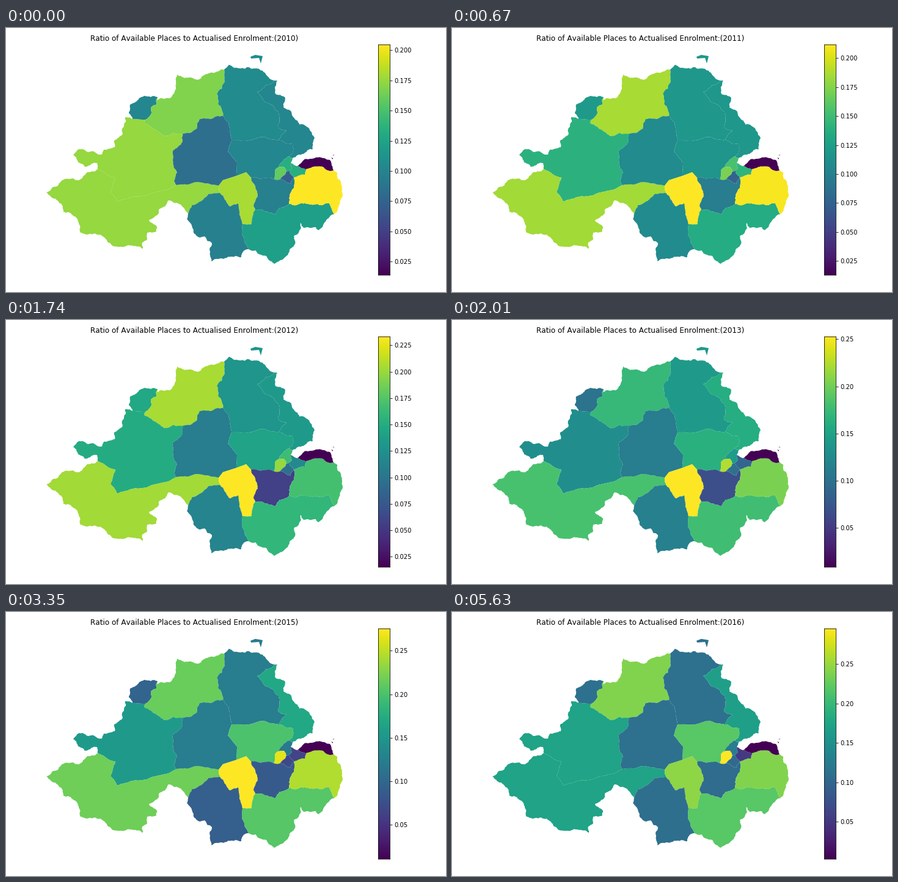
These frames come from a looping animation (720 px wide and 432 px high, 6.7 s). A matplotlib script:

```python
import numpy as np
import matplotlib.pyplot as plt
from matplotlib.animation import FuncAnimation
from matplotlib.patches import Polygon

W, H, DPI = 720, 432, 72
plt.rcParams.update({"font.family": "DejaVu Sans", "text.kerning_factor": 6})
rng = np.random.default_rng(7)
viridis = plt.get_cmap("viridis")

fig = plt.figure(figsize=(W / DPI, H / DPI), dpi=DPI, facecolor="white")
ax = fig.add_axes([0, 0, 1, 1], xlim=(0, W), ylim=(H, 0))
ax.axis("off")


def crinkle(p, q, bend):
    """Fractal line from p up to q: bend the middle, then each half."""
    d = q - p
    length = np.hypot(*d)
    if length < 3:
        return [p]
    middle = (p + q) / 2 + np.array([-d[1], d[0]]) * rng.uniform(-bend, bend)
    return crinkle(p, middle, bend) + crinkle(middle, q, bend)


def line(*points, bend=0.12):
    pts = np.array(points, float)
    path = [v for p, q in zip(pts, pts[1:]) for v in crinkle(p, q, bend)]
    return np.array(path + [pts[-1]])


def coast(*points):
    return line(*points, bend=0.16)


def ring(first, *arcs):
    """Join arcs end to end, reversing those that run the other way."""
    if any(np.array_equal(first[0], arcs[0][k]) for k in (0, -1)):
        first = first[::-1]
    path = list(first)
    for arc in arcs:
        path.extend(arc[1:] if np.array_equal(arc[0], path[-1]) else arc[-2::-1])
    return path


# Junctions: on the coast clockwise, then inland
derry_e, north_e, causeway_e, glens_s = (248, 113), (357, 68), (444, 86), (469, 213)
harbour, bay_w, bay_e, ards_s = (466, 221), (476, 226), (536, 233), (537, 305)
down_w, armagh_w, lakes_n, derry_w = (397, 362), (298, 304), (150, 231), (207, 149)
derry_s, mid_nw, mid_ne, antrim_nw = (228, 150), (289, 173), (355, 144), (369, 184)
antrim_ne, antrim_e, mid_sw, mid_se = (447, 184), (463, 210), (279, 257), (377, 242)
craig_w, craig_sw, craig_s = (348, 258), (350, 270), (387, 321)
craig_e, lisburn_nw, lisburn_se = (408, 297), (401, 245), (463, 288)
lisburn_ne, cwest_s, cwest_n = (471, 245), (439, 248), (446, 228)
cwest_e, csouth_w, csouth_n, ceast_e = (459, 235), (449, 247), (464, 233), (491, 231)

# Coastline and outer border
derry_coast = coast(derry_w, (201, 138), (203, 125), (214, 120), (226, 111), derry_e)
north_coast = coast(derry_e, (247, 118), (268, 115), (278, 97), (280, 76), (292, 82),
                    (318, 83), (330, 75), north_e)
causeway_coast = coast(north_e, (365, 60), (383, 66), (395, 64), (420, 70), (426, 77),
                       causeway_e)
glens_coast = coast(causeway_e, (441, 108), (456, 113), (454, 130), (465, 135),
                    (480, 158), (497, 167), (505, 180), (502, 198), (487, 206), glens_s)
harbour_north = line(glens_s, harbour)
harbour_east = line(harbour, bay_w)
bay_coast = coast(bay_w, (485, 218), (500, 214), (521, 213), (530, 216), bay_e)
ards_coast = coast(bay_e, (542, 237), (542, 245), (550, 264), (546, 288), ards_s)
down_coast = coast(ards_s, (511, 331), (507, 326), (487, 327), (482, 319), (480, 332),
                   (471, 341), (472, 355), (458, 374), (439, 386), (417, 371), down_w)
armagh_coast = coast(down_w, (388, 366), (385, 375), (352, 377), (336, 382),
                     (333, 362), (337, 352), (325, 341), (313, 341), (296, 313), armagh_w)
lakes_coast = coast(armagh_w, (286, 289), (266, 282), (250, 297), (250, 303), (234, 314),
                    (247, 325), (246, 333), (231, 335), (231, 346), (223, 351),
                    (224, 361), (198, 356), (182, 358), (155, 338), (121, 334),
                    (119, 318), (94, 301), (80, 279), (66, 269), (85, 258), (96, 247),
                    (120, 249), (133, 236), lakes_n)
west_coast = coast(lakes_n, (149, 221), (140, 222), (129, 227), (110, 208), (125, 198),
                   (135, 203), (157, 207), (160, 199), (178, 195), (177, 184),
                   (190, 175), (195, 146), derry_w)

# Borders between districts
derry_north = line(derry_e, (246, 125), (237, 130), (238, 139), derry_s)
derry_west = line(derry_w, derry_s, bend=0.05)
north_west = line(derry_s, (226, 155), (238, 162), (259, 177), mid_nw)
north_mid = line(mid_nw, (312, 165), (317, 149), (334, 149), mid_ne)
north_causeway = line(north_e, (358, 87), (345, 108), (347, 124), mid_ne)
causeway_glens = line(causeway_e, (425, 93), (411, 105), (424, 121), (446, 137),
                      (445, 163), (459, 168), antrim_ne)
causeway_mid = line(mid_ne, (364, 155), antrim_nw, bend=0.05)
causeway_antrim = line(antrim_nw, (398, 184), (422, 178), antrim_ne, bend=0.06)
glens_antrim = line(antrim_ne, (470, 190), (469, 205), antrim_e)
glens_city = line(antrim_e, glens_s)
mid_west = line(mid_nw, (289, 186), (273, 201), (275, 229), (280, 236), (275, 250), mid_sw)
mid_antrim = line(antrim_nw, (363, 202), (378, 220), mid_se, bend=0.03)
mid_lakes = line(craig_w, (313, 252), mid_sw, bend=0.06)
west_lakes = line(mid_sw, (262, 265), (230, 274), (182, 284), (171, 268), (179, 245),
                  lakes_n, bend=0.06)
mid_craig = line(mid_se, (355, 249), craig_w, bend=0)
antrim_craig = line(mid_se, (393, 236), lisburn_nw, bend=0)
craig_lakes = line(craig_w, craig_sw)
craig_armagh = line(craig_sw, (367, 292), (380, 287), craig_s)
armagh_lakes = line(armagh_w, (304, 290), (320, 283), (331, 272), craig_sw)
armagh_down = line(down_w, (386, 337), craig_s, bend=0.08)
craig_down = line(craig_s, (402, 321), craig_e)
craig_lisburn = line(lisburn_nw, (412, 276), (405, 290), craig_e)
lisburn_down = line(craig_e, (440, 305), (448, 294), lisburn_se)
ards_down = line(ards_s, (529, 287), (516, 290), (490, 287), lisburn_se)
ards_lisburn = line(lisburn_se, (464, 276), (471, 262), lisburn_ne)
bay_ards = line(bay_e, (527, 233), (520, 228), ceast_e)
bay_east = line(bay_w, ceast_e)
ards_east = line(ceast_e, (489, 240), lisburn_ne)
antrim_lisburn = line(lisburn_nw, (419, 246), cwest_s)
antrim_cwest = line(cwest_s, (440, 233), cwest_n)
antrim_cnorth = line(cwest_n, (457, 214), antrim_e)
cwest_cnorth = line(cwest_n, (455, 227), cwest_e)
cwest_csouth = line(cwest_e, csouth_w)
cwest_lisburn = line(cwest_s, csouth_w)
csouth_lisburn = line(csouth_w, (465, 255), lisburn_ne)
cnorth_csouth = line(cwest_e, csouth_n)
csouth_ceast = line(csouth_n, lisburn_ne)
cnorth_ceast = line(csouth_n, (468, 229), harbour)

districts = []


def shape(levels, outline):
    patch = Polygon(outline, closed=True, linewidth=0)
    ax.add_patch(patch)
    districts.append((patch, levels))


def district(levels, *arcs):
    shape(levels, ring(*arcs))


def trend(start, end, power=1):
    """Seven yearly levels that ease out from start to end."""
    return start + (end - start) * (1 - (1 - np.linspace(0, 1, 7)) ** power)


# Position on the colour scale for each year, 2010 to 2016
causeway = (.48, .53, .52, .54, .36, .42, .37)
bay = trend(0, 0)
district((.46, .54, .60, .38, .44, .32, .37), derry_coast, derry_north, derry_west)
district((.81, .87, .87, .67, .77, .77, .81),
         north_coast, north_causeway, north_mid, north_west, derry_north)
district(causeway, causeway_coast, causeway_glens, causeway_antrim, causeway_mid,
         north_causeway)
district((.46, .53, .54, .62, .64, .60, .56),
         glens_coast, glens_city, glens_antrim, causeway_glens)
district((.84, .64, .61, .49, .43, .54, .58),
         west_coast, derry_west, north_west, mid_west, west_lakes)
district((.84, .86, .86, .71, .73, .78, .58),
         lakes_coast, west_lakes, mid_lakes, craig_lakes, armagh_lakes)
district((.36, .48, .42, .42, .36, .42, .37),
         north_mid, causeway_mid, mid_antrim, mid_craig, mid_lakes, mid_west)
district(trend(.46, .74, 1.4),
         causeway_antrim, glens_antrim, antrim_cnorth, antrim_cwest,
         antrim_lisburn, antrim_craig, mid_antrim)
district((.87, 1, 1, 1, 1, 1, .83),
         mid_craig, antrim_craig, craig_lisburn, craig_down, craig_armagh, craig_lakes)
district((.43, .48, .45, .43, .43, .30, .36),
         armagh_lakes, craig_armagh, armagh_down, armagh_coast)
district((.43, .42, .19, .24, .22, .28, .35),
         antrim_lisburn, cwest_lisburn, csouth_lisburn, ards_lisburn,
         lisburn_down, craig_lisburn)
district(trend(.56, .74, 2),
         ards_down, down_coast, armagh_down, craig_down, lisburn_down)
district((1, .99, .70, .80, .82, .88, .81),
         ards_coast, ards_down, ards_lisburn, ards_east, bay_ards)
district(bay, bay_coast, bay_ards, bay_east)
district((.63, .71, .69, .55, .56, .41, .42),
         glens_city, harbour_north, cnorth_ceast, cnorth_csouth, cwest_cnorth,
         antrim_cnorth)
district(trend(.76, 1), antrim_cwest, cwest_cnorth, cwest_csouth, cwest_lisburn)
district((.30, .32, .37, .37, .37, .22, .34),
         cnorth_csouth, csouth_ceast, csouth_lisburn, cwest_csouth)
district((.63, .65, .47, .33, .31, .20, .17),
         harbour_east, bay_east, ards_east, csouth_ceast, cnorth_ceast)

# Islands
shape(causeway, [(400, 47), (408, 44), (420, 46), (417, 58), (414, 49), (401, 50)])
shape(bay, [(532, 212), (535, 213), (535, 215)])
shape(bay, [(534, 208), (537, 207.5), (537, 208.5)])

title = ax.text(308, 21, "", fontsize=12, ha="center", va="baseline")

bar = fig.add_axes([609.4 / W, 27.7 / H, 18.85 / W, 377 / H])
bar.imshow(np.linspace(0, 1, 256)[:, None], cmap=viridis, origin="lower",
           extent=(0, 1, 0, 1), transform=bar.transAxes, aspect="auto",
           interpolation="nearest")
bar.set(xlim=(0, 1), xticks=[])
bar.yaxis.tick_right()

LIMITS = [(.0138, .2046), (.0129, .2116), (.0152, .2331), (.0086, .2526),
          (.0118, .2737), (.0107, .2753), (.0027, .2950)]


def draw(i):
    year = min(i, len(LIMITS) - 1)  # the last year is held
    low, high = LIMITS[year]
    for patch, levels in districts:
        patch.set_facecolor(viridis(float(levels[year])))
    title.set_text(f"Ratio of Available Places to Actualised Enrolment:({2010 + year})")
    step, digits = (.025, 3) if high < .24 else (.05, 2)
    ticks = np.arange(np.ceil(low / step), np.floor(high / step) + 1) * step
    bar.set_ylim(low, high)
    bar.set_yticks(ticks, [f"{v:.{digits}f}" for v in ticks])
    return []


anim = FuncAnimation(fig, draw, frames=10, interval=670, repeat=True,
                     repeat_delay=0, blit=False)
plt.show()
```
